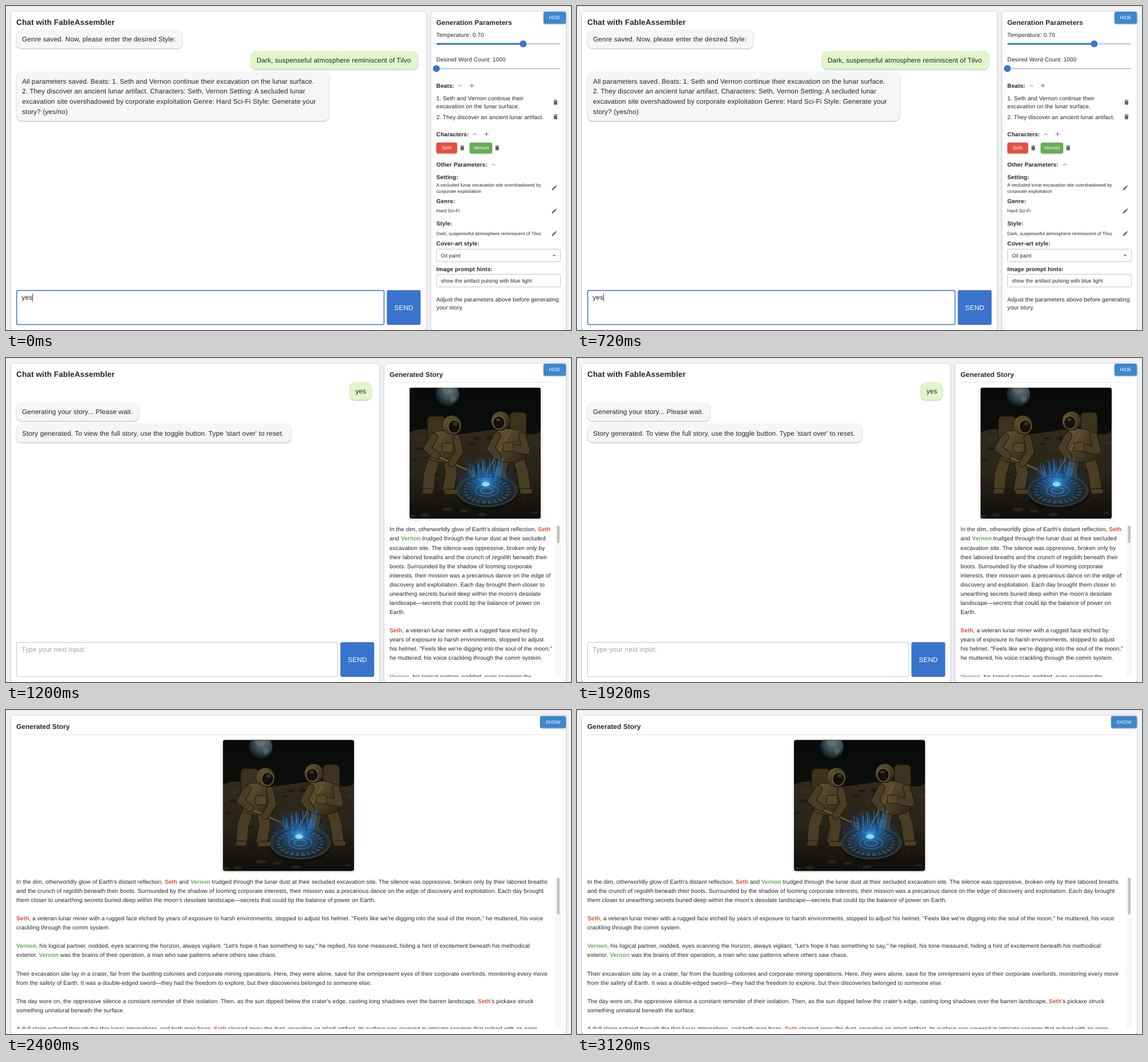
Animation, 987 px wide and 567 px high, one loop 3600 ms. Source, as an HTML page:

```html
<!DOCTYPE html>
<html lang="en">
<head>
<meta charset="utf-8">
<title>Story chat</title>
<style>
html, body { margin: 0; width: 100%; height: 100%; overflow: hidden; background: #f0f2f6; }
svg { display: block; width: 987px; height: 567px; }
text { font-family: "Liberation Sans", Arial, Helvetica, sans-serif; letter-spacing: .0094em;
  text-rendering: geometricPrecision; white-space: pre; }
.card { filter: drop-shadow(0 1px 2px rgba(0,0,0,.22)); }
.bubble { filter: drop-shadow(0 1px .8px rgba(0,0,0,.3)); }
.btn { filter: drop-shadow(0 1px 1.2px rgba(0,0,0,.35)); }
</style>
</head>
<body>
<svg id="stage" viewBox="0 0 987 567">
  <defs>
    <linearGradient id="sky" x2="0" y2="1">
      <stop offset="0" stop-color="#080a09"/><stop offset="1" stop-color="#15150f"/>
    </linearGradient>
    <linearGradient id="ground" x2="0" y2="1">
      <stop offset="0" stop-color="#302a1c"/><stop offset=".5" stop-color="#29241a"/><stop offset="1" stop-color="#100e0b"/>
    </linearGradient>
    <linearGradient id="suit" x2="1" y2="1">
      <stop offset="0" stop-color="#6a5935"/><stop offset="1" stop-color="#2a2315"/>
    </linearGradient>
    <radialGradient id="earth" cx=".6" cy=".35" r=".65">
      <stop offset="0" stop-color="#66757a"/><stop offset=".6" stop-color="#35464f"/><stop offset="1" stop-color="#10181c"/>
    </radialGradient>
    <radialGradient id="glow">
      <stop offset="0" stop-color="#4ab4ff" stop-opacity=".95"/><stop offset=".2" stop-color="#2384dc" stop-opacity=".65"/>
      <stop offset=".55" stop-color="#15549e" stop-opacity=".28"/><stop offset="1" stop-color="#0c3569" stop-opacity="0"/>
    </radialGradient>
    <clipPath id="frame"><rect width="229" height="229" rx="4"/></clipPath>
    <clipPath id="scroll"><rect y="288" width="987" height="270"/></clipPath>
  </defs>
  <rect width="987" height="567" fill="#f0f2f6"/>
  <rect width="987" height="1.2" fill="#fbe6df"/>
  <g id="scenes"></g>
</svg>
<script>
const INK = '#242424', BLUE = '#3973cc', GREY = '#666';
const CAST = { Seth: '#e04a36', Vernon: '#5fa653' };
const BODY = 11.8, SMALL = 10.04, STEP = 16.07;

const rect = (x, y, x2, y2, fill, rx = 0, more = '') =>
  `<rect x="${x}" y="${y}" width="${x2 - x}" height="${y2 - y}" rx="${rx}" fill="${fill}" ${more}/>`;
const text = (x, y, str, size = SMALL, fill = INK, more = '') =>
  `<text x="${x}" y="${y}" font-size="${size}" fill="${fill}" ${more}>${str}</text>`;
const bold = (x, y, str, size = SMALL) => text(x, y, str, size, INK, 'font-weight="700"');
const mid = (x, y, str, size) => text(x, y, str, size, '#fff', 'text-anchor="middle"');
const line = (d, color = GREY, w = 1) => `<path d="${d}" fill="none" stroke="${color}" stroke-width="${w}"/>`;
const at = (x, y, body) => `<g transform="translate(${x} ${y})">${body}</g>`;

const card = (x, x2) => rect(x, 10, x2, 568, '#fff', 6, 'class="card"');
const bubble = (x, y, x2, y2, lines, mine) =>
  rect(x, y, x2, y2, mine ? '#e1f6cb' : '#f5f6f7', 9, 'class="bubble"') +
  lines.map((s, i) => text(x + 9.7, y + 20.2 + i * 17.72, s, BODY)).join('');
const toggle = (x, y, label) =>
  rect(x, y, 978, y + 21, '#3f86cd', 3, 'class="btn"') + mid((x + 978) / 2 + .1, y + 13.3, label, 8.26);
const send = x => rect(x, 497.3, x + 59, 558, BLUE, 3) + mid(x + 29.6, 531.8, 'SEND', BODY);
const box = (x, y, x2, y2, color = '#c4c4c4', w = 1) =>
  rect(x, y, x2, y2, '#fff', 2.5, `stroke="${color}" stroke-width="${w}"`);

const chevron = (x, y) => at(x, y, line('M-2.8 1.5L0 -1.3L2.8 1.5'));
const plus = (x, y) => at(x, y, line('M-3.5 0H3.5M0 -3.5V3.5'));
const trash = (x, y) => at(x, y,
  `<path d="M-3 -2.3H3V3.3Q3 4.3 2 4.3H-2Q-3 4.3 -3 3.3ZM-3.6 -3.9H-1.7L-1.1 -4.5H1.1L1.7 -3.9H3.6V-2.9H-3.6Z" fill="${GREY}"/>`);
const pencil = (x, y) => at(x, y,
  `<path d="M-4.2 4.2V2.3L1.4 -3.2L3.2 -1.4L-2.3 4.2ZM2 -3.8L2.9 -4.5L4.5 -2.9L3.8 -2Z" fill="${GREY}"/>`);
const slider = (y, x) =>
  rect(752, y - 1, 968.5, y + 1, '#b0c8ea', 1) + rect(752, y - 1.5, x, y + 1.5, BLUE, 1.5) +
  `<circle cx="${x}" cy="${y}" r="6" fill="${BLUE}"/>`;
const chip = (x, x2, name, fill) =>
  rect(x, 239, x2, 257.8, fill, 3, 'class="btn"') + mid((x + x2) / 2, 251.4, name, 8.6);

// Small seeded generator for rocks and sparks
function random(seed) {
  return () => (seed = (seed * 16807) % 2147483647) / 2147483647;
}

function limb(d, w) {
  return line(d, '#1a160e', w + 2).replace('/>', ' stroke-linecap="round" stroke-linejoin="round"/>') +
    line(d, '#4a3d24', w).replace('/>', ' stroke-linecap="round" stroke-linejoin="round"/>');
}

function helmet(x, y, look) {
  return `<circle cx="${x}" cy="${y}" r="16.5" fill="url(#suit)" stroke="#1a160e"/>` +
    `<ellipse cx="${x + look}" cy="${y + 3}" rx="10.5" ry="11.5" fill="#12110d" stroke="#796642" stroke-width="1.3"/>` +
    `<ellipse cx="${x + look * 1.4}" cy="${y - 2}" rx="4" ry="3" fill="#39331f"/>`;
}

function picture() {
  const r = random(77);
  let rocks = '', sparks = '', marks = '';
  for (let i = 0; i < 60; i++) {
    const y = 85 + r() * 140, w = 2 + r() * 9;
    rocks += `<ellipse cx="${(r() * 229).toFixed(1)}" cy="${y.toFixed(1)}" rx="${w.toFixed(1)}" ry="${(w * .35).toFixed(1)}" fill="${r() < .5 ? '#15120d' : '#3a3323'}" opacity=".55"/>`;
  }
  for (let i = 0; i < 34; i++) {
    const x = 133 + (r() - .5) * 56, h = 6 + r() * 26;
    sparks += `M${x.toFixed(1)} ${(164 - r() * 16).toFixed(1)}l${((x - 133) * .12).toFixed(1)} ${(-h).toFixed(1)}`;
  }
  for (let i = 0; i < 24; i++) {
    const a = i * Math.PI / 12, c = Math.cos(a), s = Math.sin(a);
    marks += `M${(135 + 32 * c).toFixed(1)} ${(180 + 17 * s).toFixed(1)}L${(135 + 44 * c).toFixed(1)} ${(180 + 23.5 * s).toFixed(1)}`;
  }
  const ring = (rx, ry, color, w) =>
    `<ellipse cx="135" cy="180" rx="${rx}" ry="${ry}" fill="none" stroke="${color}" stroke-width="${w}"/>`;
  return rect(0, 0, 229, 229, '#111', 4, 'class="card"') + '<g clip-path="url(#frame)">' +
    rect(0, 0, 229, 229, 'url(#sky)') +
    '<circle cx="66" cy="12" r="20.5" fill="url(#earth)"/>' +
    '<path d="M55 2Q66 -2 71 7Q64 14 60 9ZM70 17Q79 11 81 20L73 26Z" fill="#747562" opacity=".55"/>' +
    '<path d="M0 78Q22 68 45 76T98 80T140 74T190 79T229 72V229H0Z" fill="url(#ground)"/>' + rocks +
    // left figure
    rect(31, 50, 62, 97, '#3c321e', 7, 'stroke="#1a160e"') +
    limb('M44 122L35 150L33 174M68 122L73 150L68 176', 19) +
    limb('M27 181L37 181M65 182L79 182', 8) +
    '<path d="M42 78Q63 70 86 83L84 124Q61 138 35 126Z" fill="url(#suit)" stroke="#1a160e"/>' +
    line('M30 112L103 145', '#6d5939', 2.5) + '<path d="M98 139L112 146L116 155L102 151Z" fill="#443922"/>' +
    limb('M43 86L31 106L47 119M82 88L87 112L74 132', 12) +
    rect(57, 97, 76, 113, '#554628', 2, 'stroke="#211b10"') + helmet(74, 65, 4) +
    // right figure
    rect(175, 43, 204, 91, '#3c321e', 7, 'stroke="#1a160e"') +
    limb('M164 122L158 149L163 174M190 122L198 150L201 174', 19) +
    limb('M157 181L169 181M197 181L210 181', 8) +
    '<path d="M150 77Q172 65 199 79L202 124Q176 138 150 125Z" fill="url(#suit)" stroke="#1a160e"/>' +
    line('M174 79L132 153', '#6d5939', 2.5) +
    limb('M153 84L142 106L153 119M197 84L204 110L183 106', 12) +
    rect(163, 96, 181, 111, '#554628', 2, 'stroke="#211b10"') + helmet(159, 58, -3) +
    // carved disc
    '<ellipse cx="135" cy="187" rx="53" ry="28" fill="#0d100f"/>' +
    '<ellipse cx="135" cy="180" rx="53" ry="28" fill="#2b302c" stroke="#4a4a3b"/>' +
    ring(46, 24.5, '#10191f', 1.5) + ring(38, 20, '#506169', 4) + ring(38, 20, '#16232c', 1.2) +
    ring(27, 14, '#143650', 2) + ring(20, 10, '#3577a6', 1.6) + ring(11, 5.5, '#4fa9e3', 1.2) +
    line(marks, '#101b23', 2) +
    '<ellipse cx="133" cy="165" rx="60" ry="46" fill="url(#glow)"/>' +
    line(sparks, '#2878c7', .9) +
    '<ellipse cx="133" cy="169" rx="7" ry="4" fill="#8dd8ff"/>' + '</g>';
}

const tint = s => s.replace(/Seth|Vernon/g, n => `<tspan font-weight="700" fill="${CAST[n]}">${n}</tspan>`);
function story(x, y, lines, thumb) {
  return '<g clip-path="url(#scroll)">' +
    lines.map((s, i) => s && text(x, (y + i * STEP).toFixed(2), tint(s))).join('') + '</g>' +
    rect(960.3, 292, 968.5, 558, '#f8f9f9') + line('M960.5 292V558M968.3 292V558', '#ececec', .6) +
    rect(962.4, 293.5, 967, thumb, '#c1c1c1', 2.3);
}

function setup() {
  return card(9, 733.5) + bold(18, 32.6, 'Chat with FableAssembler', 13.5) +
    bubble(18.3, 42, 307.8, 74, ['Genre saved. Now, please enter the desired Style:']) +
    bubble(428, 79, 719.8, 110.5, ['Dark, suspenseful atmosphere reminiscent of Tilvo'], true) +
    bubble(18.3, 115.3, 564, 201, [
      'All parameters saved. Beats: 1. Seth and Vernon continue their excavation on the lunar surface.',
      '2. They discover an ancient lunar artifact. Characters: Seth, Vernon Setting: A secluded lunar',
      'excavation site overshadowed by corporate exploitation Genre: Hard Sci-Fi Style: Generate your',
      'story? (yes/no)']) +
    box(18.7, 497.7, 660.4, 557.5, BLUE, 1.5) + text(27.3, 514.2, 'yes', BODY) +
    line('M46.5 503.5V517', '#222', .9) + send(665.3) +
    card(743, 978) + bold(751.8, 32.6, 'Generation Parameters', BODY) + toggle(939, 10, 'HIDE') +
    text(751.8, 53.6, 'Temperature: 0.70') + slider(66.2, 903.5) +
    text(751.8, 96.8, 'Desired Word Count: 1000') + slider(109.5, 751.8) +
    bold(751.8, 143, 'Beats:') + chevron(793.5, 139.5) + plus(813.8, 139.4) +
    text(751.8, 164.9, '1. Seth and Vernon continue their') + text(751.8, 179.2, 'excavation on the lunar surface.') + trash(960, 168.5) +
    text(751.8, 197.7, '2. They discover an ancient lunar artifact.') + trash(960, 194) +
    bold(751.8, 227.8, 'Characters:') + chevron(819, 224.4) + plus(839.5, 224.2) +
    chip(751.8, 788, 'Seth', '#e5503f') + trash(797, 248.3) + chip(810, 849.2, 'Vernon', '#65ad57') + trash(858, 248.3) +
    bold(751.8, 280.8, 'Other Parameters:') + chevron(851.7, 277.5) +
    bold(751.8, 302.8, 'Setting:') + text(751.8, 315.6, 'A secluded lunar excavation site overshadowed by', 8) +
    text(751.8, 326.8, 'corporate exploitation', 8) + pencil(958, 318) +
    bold(751.8, 344.9, 'Genre:') + text(751.8, 361.4, 'Hard Sci-Fi', 8) + pencil(958, 358.5) +
    bold(751.8, 384.2, 'Style:') + text(751.8, 401, 'Dark, suspenseful atmosphere reminiscent of Tilvo', 8) + pencil(958, 398) +
    bold(751.8, 419.2, 'Cover-art style:') + box(752, 425.5, 968.4, 447.5) + text(759.8, 439.8, 'Oil paint', 9.1) +
    `<path d="M954.8 435.4H960.4L957.6 438.2Z" fill="${GREY}"/>` +
    bold(751.8, 463.5, 'Image prompt hints:') + box(752, 469.5, 968.4, 491.7) +
    text(759.8, 483.7, 'show the artifact pulsing with blue light', 9.1) +
    text(751.8, 516.6, 'Adjust the parameters above before generating') + text(751.8, 531, 'your story.');
}

function split() {
  return card(9, 652) + bold(18, 32.6, 'Chat with FableAssembler', 13.5) +
    bubble(600.8, 42, 638.3, 73.3, ['yes'], true) +
    bubble(18.3, 78, 232.3, 110.2, ['Generating your story... Please wait.']) +
    bubble(18.3, 115.3, 498, 147.5, ["Story generated. To view the full story, use the toggle button. Type 'start over' to reset."]) +
    box(18.5, 497.5, 579.4, 557.7) + text(27.3, 514.2, 'Type your next input:', BODY, '#a2a2a2') + send(584.2) +
    card(661, 978) + bold(670, 32.6, 'Generated Story', BODY) + line('M670 42.6H968.5', '#e2e2e2') +
    toggle(939, 10, 'HIDE') + at(705, 52, picture()) +
    story(670, 303.4, [
      "In the dim, otherworldly glow of Earth's distant reflection, Seth",
      'and Vernon trudged through the lunar dust at their secluded',
      'excavation site. The silence was oppressive, broken only by',
      'their labored breaths and the crunch of regolith beneath their',
      'boots. Surrounded by the shadow of looming corporate',
      'interests, their mission was a precarious dance on the edge of',
      'discovery and exploitation. Each day brought them closer to',
      'unearthing secrets buried deep within the moon’s desolate',
      'landscape—secrets that could tip the balance of power on',
      'Earth.', '',
      'Seth, a veteran lunar miner with a rugged face etched by',
      'years of exposure to harsh environments, stopped to adjust',
      'his helmet. "Feels like we\'re digging into the soul of the moon,"',
      'he muttered, his voice crackling through the comm system.', '',
      'Vernon, his logical partner, nodded, eyes scanning the'], 324);
}

function full() {
  return card(9, 978) + bold(18, 33, 'Generated Story', BODY) + line('M18 43.3H968.5', '#e2e2e2') +
    toggle(933, 10.5, 'SHOW') + at(379, 52.6, picture()) +
    story(18, 303.9, [
      "In the dim, otherworldly glow of Earth's distant reflection, Seth and Vernon trudged through the lunar dust at their secluded excavation site. The silence was oppressive, broken only by their labored breaths",
      'and the crunch of regolith beneath their boots. Surrounded by the shadow of looming corporate interests, their mission was a precarious dance on the edge of discovery and exploitation. Each day brought',
      'them closer to unearthing secrets buried deep within the moon’s desolate landscape—secrets that could tip the balance of power on Earth.', '',
      'Seth, a veteran lunar miner with a rugged face etched by years of exposure to harsh environments, stopped to adjust his helmet. "Feels like we\'re digging into the soul of the moon," he muttered, his voice',
      'crackling through the comm system.', '',
      'Vernon, his logical partner, nodded, eyes scanning the horizon, always vigilant. "Let\'s hope it has something to say," he replied, his tone measured, hiding a hint of excitement beneath his methodical',
      'exterior. Vernon was the brains of their operation, a man who saw patterns where others saw chaos.', '',
      'Their excavation site lay in a crater, far from the bustling colonies and corporate mining operations. Here, they were alone, save for the omnipresent eyes of their corporate overlords, monitoring every move',
      'from the safety of Earth. It was a double-edged sword—they had the freedom to explore, but their discoveries belonged to someone else.', '',
      "The day wore on, the oppressive silence a constant reminder of their isolation. Then, as the sun dipped below the crater's edge, casting long shadows over the barren landscape, Seth's pickaxe struck",
      'something unnatural beneath the surface.', '',
      'A dull clang echoed through the thin lunar atmosphere, and both men froze. Seth cleared away the dust, revealing an inlaid artifact. Its surface was covered in intricate carvings that pulsed with an eerie'], 358);
}

const root = document.getElementById('scenes');
root.innerHTML = [setup, split, full].map(f => `<g>${f()}</g>`).join('');
const scenes = [...root.children];

function draw(ms) {
  const now = Math.floor(ms % 3600 / 1200);
  scenes.forEach((g, i) => g.style.display = i === now ? '' : 'none');
}

const start = performance.now();
function tick() {
  draw(performance.now() - start);
  requestAnimationFrame(tick);
}
tick();
</script>
</body>
</html>
```
